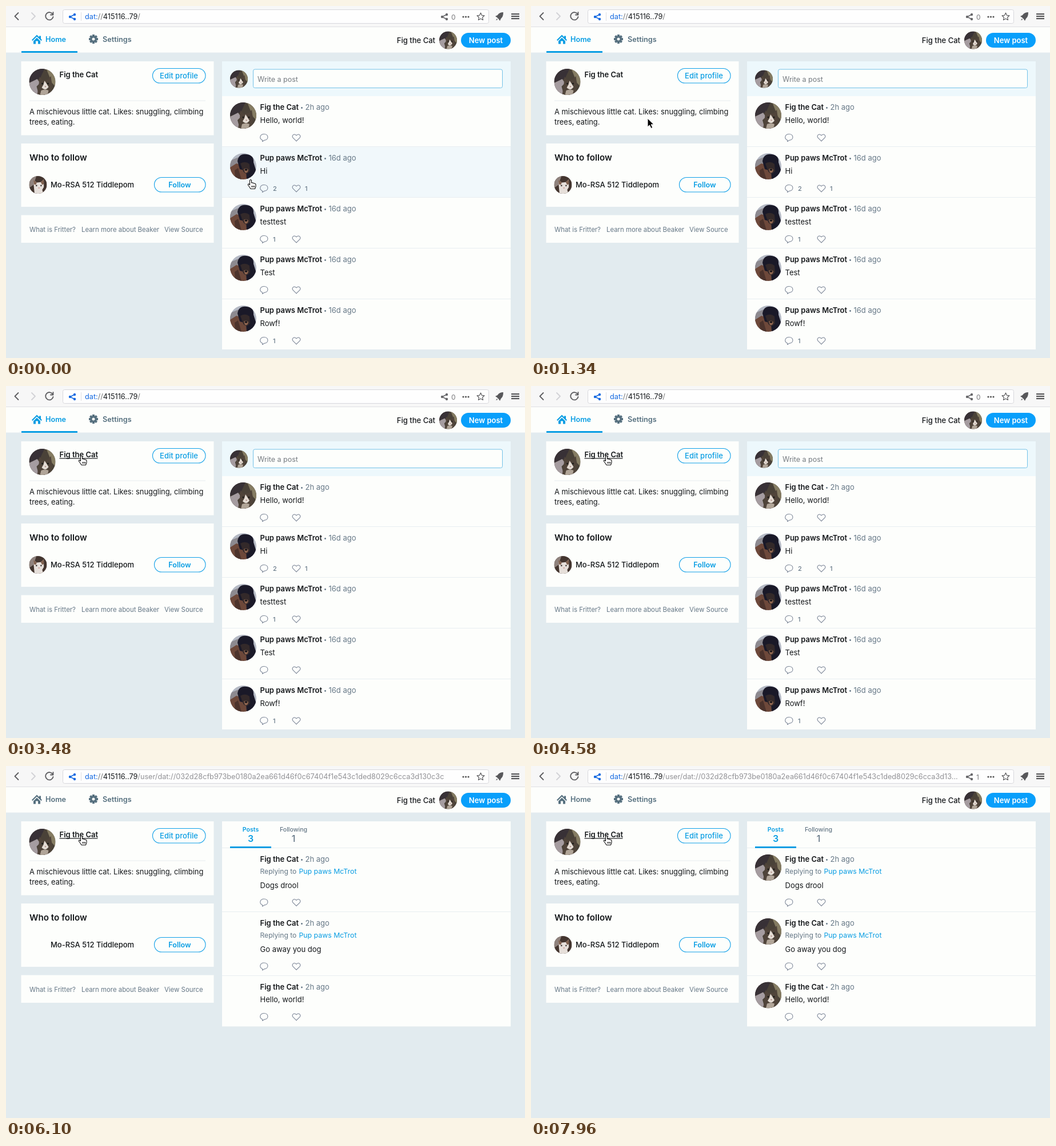
An HTML page that plays this animation: 908 by 617 pixels, repeating every 8 s.

```html
<!DOCTYPE html>
<html lang="en">
<head>
<meta charset="utf-8">
<title>Social feed</title>
<style>
  html, body { margin: 0; width: 100%; height: 100%; overflow: hidden; background: #e2ebef; }
  svg { display: block; width: 100vw; height: 100vh; }
  text { font: 400 13px Inter, sans-serif; fill: #14171a; white-space: pre; }
  .bold { font-weight: 600; }
  .medium { font-weight: 500; }
  .muted { fill: #657786; }
  .blue { fill: #089de3; }
  .card { fill: #fdfefc; }
  .rule { fill: #e8eef1; }
  .pill { fill: #fdfefc; stroke: #0f9fe8; stroke-width: 1.1; }
  .line { fill: none; stroke: #7d8798; stroke-width: 1.1; stroke-linejoin: round; }
  .chrome { fill: none; stroke: #5c5c5f; stroke-width: 1.8; stroke-linecap: round; stroke-linejoin: round; }
  .url { font-size: 12.7px; }
</style>
</head>
<body>
<svg id="stage" viewBox="0 0 908 617" xmlns="http://www.w3.org/2000/svg">
  <defs>
    <clipPath id="round"><circle r="23"/></clipPath>
    <g id="cat" clip-path="url(#round)">
      <rect x="-23" y="-23" width="46" height="46" fill="#4a4238"/>
      <path d="M-23-23H4L-4-6L-23 1Z" fill="#383136"/>
      <path d="M-23 2L-9-5L-4 2L-10 8L-6 23H-23Z" fill="#a59ca0"/>
      <path d="M7-23H23V8L17 2L13-8Z" fill="#857c62"/>
      <path d="M-9 23L-6 4L-5-9L1-3L9-4L15-10L17 5L14 23Z" fill="#50443a"/>
      <path d="M4-2L2 5L-1 10Q5 17 11 9L8 4Z" fill="#e4dcd4"/>
      <path d="M-2 15Q5 12 11 15L9 23H-4Z" fill="#b1a598"/>
      <circle cx="0" cy="3" r="1.5" fill="#1c1b19"/>
      <circle cx="10" cy="3" r="1.5" fill="#1c1b19"/>
      <path d="M4 7.5H7L5.500 9.500Z" fill="#9a6b62"/>
    </g>
    <g id="dog" clip-path="url(#round)">
      <rect x="-23" y="-23" width="46" height="46" fill="#b4b9c4"/>
      <path d="M-23-10L-8-16L-6 2L-23 5Z" fill="#8d8a90"/>
      <path d="M-23 2L-12-5L4 0L10 23H-23Z" fill="#6d483a"/>
      <path d="M-15 7L-9 3L-3 23H-14Z" fill="#4c332c"/>
      <path d="M-10-9Q-8-23 6-21Q19-20 18-7L23 9V23H6L5 8L-6 5Z" fill="#1a1928"/>
      <path d="M-5-5Q4-10 11-4L12 8Q6 17 0 9Z" fill="#33292a"/>
      <path d="M1 5Q6 2 9 6Q8 13 3 11Z" fill="#8f6650"/>
      <ellipse cx="5" cy="6" rx="2.5" ry="1.700" fill="#17151a"/>
    </g>
    <g id="kitten" clip-path="url(#round)">
      <rect x="-23" y="-23" width="46" height="46" fill="#43352f"/>
      <path d="M-23-23H-4L-12 0L-23 8Z" fill="#8f827d"/>
      <path d="M-9 23L-11 2L-12-13L-3-6L7-7L15-14L15 6L11 13L14 23Z" fill="#e6dfda"/>
      <path d="M-12-13L-3-6L-6 0L-11-2ZM15-14L7-7L11 0L15-2Z" fill="#80614f"/>
      <circle cx="-4" cy="2" r="2" fill="#443d3a"/><circle cx="8" cy="2" r="2" fill="#443d3a"/>
      <path d="M0 7H5L2.500 10Z" fill="#cb8f8b"/>
    </g>
    <g id="share">
      <path d="M4-4L-4 0L4 4" fill="none" stroke="currentColor" stroke-width="1.600"/>
      <g fill="currentColor"><circle cx="4" cy="-4" r="2.200"/><circle cx="-4" r="2.200"/><circle cx="4" cy="4" r="2.200"/></g>
    </g>
    <path id="house" d="M-9 1L0-8L4-4V-6H7V-1L9 1L7.500 2.500L0-5L-7.500 2.500ZM-6 3L0-3L6 3V8H2V3H-2V8H-6Z"/>
    <path id="heart" class="line" d="M0 6.300L-6 .3C-8.500-3-4.500-8 0-3.700C4.500-8 8.500-3 6 .3Z"/>
    <path id="bubble" class="line" d="M-3 4.500C-9 2-7.500-6 0-6C8.500-6 8.500 4.500 .5 4.700L-3 7Z"/>
  </defs>
  <g id="page"></g>
  <path id="arrow" d="M0 0V15L3.500 11.800L6 17.500L8.700 16.300L6.200 10.800H11Z" stroke="#fff"/>
  <path id="hand" d="M-1.500 1.500Q0-.5 1.500 1.500V6Q3 4.800 4 6.600Q5.500 5.500 6.500 7.300Q8.700 6.700 9 9V12Q8.500 14 7.500 16.500H0Q-1-14 0 16.500Q-2 13-4.500 10Q-5.500 7.500-3 8L-1.500 9.500Z M2 11V14M4.200 11V14M6.400 11V14" fill="#fff" stroke="#111" stroke-width="1.100" stroke-linejoin="round"/>
</svg>
<script>
const LOOP = 8000;
const NAVIGATE = 5300, LOADED = 5960, AVATARS = 6200, SHARED = 6340;
const CAT = 'Fig the Cat', DOG = 'Pup paws McTrot', KITTEN = 'Mo-RSA 512 Tiddlepom';
const POSTS_TOP = 158, ROW = 89;

const $ = id => document.getElementById(id);
const text = (x, y, str, cls = '', attrs = '') => `<text x="${x}" y="${y}" class="${cls}" ${attrs}>${str}</text>`;
const sized = (x, y, str, size, cls = '', extra = '') => text(x, y, str, cls, `style="font-size:${size}px;${extra}"`);
const centered = (x, y, str, size, cls, extra = '') => sized(x, y, str, size, cls, 'text-anchor:middle;' + extra);
const rect = (x, y, w, h, cls, attrs = '') => `<rect x="${x}" y="${y}" width="${w}" height="${h}" class="${cls}" ${attrs}/>`;
const use = (id, x, y, attrs = '') => `<use href="#${id}" transform="translate(${x} ${y})" ${attrs}/>`;
const avatar = (id, x, y, r = 23) => `<use href="#${id}" transform="translate(${x} ${y}) scale(${r / 23})"/>`;
const group = (id, ...parts) => `<g id="${id}">${parts.join('')}</g>`;
const actions = (y, replies = '', likes = '') =>
  use('bubble', 451.5, y) + use('heart', 508, y) +
  sized(467, y + 4, replies, 11, 'medium muted') + sized(523, y + 4, likes, 11, 'medium muted');
const byline = (y, name, dotX, age) =>
  text(444.5, y, name, 'bold') + `<circle cx="${dotX}" cy="${y - 3.5}" r="1.4" fill="#657786"/>` +
  text(dotX + 6, y, age, 'muted');

const gear = () => {
  const teeth = Array.from({ length: 8 }, (_, i) => rect(-2, -8, 4, 5, '', `transform="rotate(${i * 45})"`)).join('');
  return `<g transform="translate(153 58)" fill="#56707f">${teeth}<circle r="4.300" fill="none" stroke="#56707f" stroke-width="3.600"/></g>`;
};

const host = `<tspan fill="#1469e0">dat:</tspan><tspan fill="#777">//</tspan>415116..79`;
const hash = '032d28cfb973be0180a2ea661d46f0c67404f1e543c1ded8029c6cca3d130c3c';
const profileUrl = key => text(138, 23, `${host}<tspan fill="#929296">/user/dat://${key}</tspan>`, 'url');

const shareCount = (id, count) => group(id,
  use('share', 767, 19, 'color="#68686b"'), sized(779, 23.5, count, 12, '', 'fill:#77777a'));

const chrome = () => [
  rect(0, 0, 908, 37, '', 'fill="#f7f7f7"'), rect(0, 36, 908, 1, '', 'fill="#e0e0e3"'),
  '<path class="chrome" d="M21.500 12L15.500 18L21.500 24"/>',
  '<path class="chrome" d="M45 12L51 18L45 24" style="stroke:#d2d2d6"/>',
  '<path class="chrome" d="M81.500 14A6.700 6.700 0 1 0 82.500 19M82.500 11V15.500H78"/>',
  rect(99.5, 6.5, 745, 24, '', 'rx="3" fill="#fefefe" stroke="#d8d8dc"'),
  use('share', 116, 19, 'color="#1469e0"'), rect(131, 11, 1, 15, '', 'fill="#dedee2"'),
  group('homeUrl', text(138, 23, host + '<tspan fill="#777">/</tspan>', 'url')),
  group('fullUrl', profileUrl(hash)),
  group('cutUrl', profileUrl(hash.slice(0, -4) + '...')),
  shareCount('noShares', 0), shareCount('oneShare', 1),
  ...[800, 804.5, 809].map(x => `<circle cx="${x}" cy="19" r="1.600" fill="#555"/>`),
  '<path class="chrome" d="M830.500 12L832.400 16.300L837 16.800L833.600 20L834.500 24.500L830.500 22.200L826.500 24.500L827.400 20L824 16.800L828.600 16.300Z" style="stroke-width:1.200"/>',
  '<path d="M870 11Q863 11 860 16L856 18L859 20L862 23L864 26L866 22Q870 19 870 11ZM859 22L857 25L860 24Z" fill="#57575a"/>',
  ...[13, 17, 21].map(y => rect(884, y, 14, 2.2, '', 'fill="#555558"'))
].join('');

const navigation = () => [
  rect(0, 37, 908, 45, 'card'), rect(0, 81.5, 908, 1, 'rule'),
  group('homeTab', use('house', 54, 58.5), sized(69, 63, 'Home', 12.7, 'bold', 'fill:inherit')),
  rect(27, 79, 98, 3, 'blue', 'id="homeLine"'),
  gear(), sized(169, 63, 'Settings', 12.7, 'bold', 'fill:#56707f'),
  sized(751, 65, CAT, 13, 'medium', 'text-anchor:end'), avatar('cat', 773.5, 60, 15.5),
  rect(796, 47, 87, 26, '', 'rx="13" fill="#089ffb"'),
  centered(839.5, 65, 'New post', 13, 'bold', 'fill:#fff')
].join('');

const sidebar = () => [
  rect(26.5, 97, 337, 129.5, 'card'), avatar('cat', 63.5, 133), text(93.5, 125, CAT, 'bold'),
  rect(93.5, 126.3, 67, 1.2, '', 'id="nameLine" fill="#14171a"'),
  rect(256.5, 109.5, 92.5, 25.5, 'pill', 'rx="12.750"'), centered(302.5, 127, 'Edit profile', 13, 'medium blue'),
  rect(41, 165.5, 308, 1, 'rule'),
  sized(41, 189.5, 'A mischievous little cat. Likes: snuggling, climbing', 12.9),
  sized(41, 207.5, 'trees, eating.', 12.9),
  group('suggestions',
    rect(26.5, 241, 337, 111, 'card'), sized(41, 271, 'Who to follow', 15.2, 'bold'),
    group('kittenPhoto', avatar('kitten', 56, 313.5, 15.5)), text(78, 318, KITTEN, 'medium'),
    rect(259.5, 300.5, 89.5, 25.5, 'pill', 'rx="12.750"'), centered(304, 318, 'Follow', 12.6, 'bold blue')),
  group('footer',
    rect(26.5, 0, 337, 48.5, 'card'), sized(41, 29.5, 'What is Fritter?', 11.4, 'muted'),
    sized(132, 29.5, 'Learn more about Beaker', 11.4, 'muted'), sized(277, 29.5, 'View Source', 11.4, 'muted'))
].join('');

const timeline = [
  [CAT, 'Hello, world!'], [DOG, 'Hi', 2, 1], [DOG, 'testtest', 1], [DOG, 'Test'], [DOG, 'Rowf!', 1]
];
const timelineRow = ([name, body, replies, likes], i) => {
  const y = POSTS_TOP + i * ROW, isCat = name === CAT;
  return rect(378, y, 505, ROW - 1, '', `id="row${i}"`) + (i < 4 ? rect(378, y + ROW - 1, 505, 1, 'rule') : '') +
    avatar(isCat ? 'cat' : 'dog', 415, y + 34) +
    byline(y + 24, name, isCat ? 517.5 : 558.5, isCat ? '2h ago' : '16d ago') +
    text(444.5, y + 47, body) + actions(y + 72.5, replies, likes);
};
const home = () => group('home',
  rect(378, 97, 505, 61, '', 'fill="#edf8fc"'), avatar('cat', 407.5, 128, 15.5),
  rect(432.5, 111, 436, 32.5, '', 'rx="3" fill="#fdfefc" stroke="#72c1e8"'),
  sized(440, 132.5, 'Write a post', 12.5, '', 'fill:#757b80'), ...timeline.map(timelineRow));

const loading = () => group('loading', rect(378, 97, 505, 47, 'card'),
  '<path id="spinner" d="M3.400-6.200A7.100 7.100 0 1 1-3.400-6.200" fill="none" stroke="#171717" stroke-width="1.700"/>',
  sized(410.5, 126, 'Loading...', 12.8, 'muted'));

const profilePosts = [[144, 'Dogs drool', true], [256, 'Go away you dog', true], [367.5, 'Hello, world!', false]];
const profileRow = ([y, body, isReply]) => {
  const shift = isReply ? 23 : 0;
  return byline(y + 24, CAT, 517.5, '2h ago') +
    (isReply ? sized(444.5, y + 45, 'Replying to', 12.1, 'muted') + sized(512.5, y + 45, DOG, 12.3, 'blue') +
      rect(378, y + 111, 505, 1, 'rule') : '') +
    text(444.5, y + 46.5 + shift, body) + actions(y + 72 + shift);
};
const profile = () => group('profile', rect(378, 97, 505, 359.5, 'card'), rect(378, 143, 505, 1, 'rule'),
  rect(392, 141, 72, 3, 'blue'),
  centered(428, 114.5, 'Posts', 10.6, 'bold blue'), centered(428, 132.5, '3', 16, 'bold blue'),
  centered(503, 114.5, 'Following', 10.6, 'medium muted'), centered(503, 132.5, '1', 16, 'medium muted'),
  ...profilePosts.map(profileRow),
  group('profilePhotos', ...profilePosts.map(([y]) => avatar('cat', 415, y + 34))));

$('page').innerHTML = rect(0, 0, 908, 617, '', 'fill="#e2ebef"') +
  chrome() + navigation() + sidebar() + home() + loading() + profile();
$('hand').setAttribute('d',
  'M-1.5 1.5Q0-.5 1.5 1.5V6Q3 4.8 4 6.6Q5.500 5.500 6.500 7.300Q8.700 6.700 9 9V12Q8.500 14 7.500 16.500H0' +
  'Q-2 13-4.500 10Q-5 7.500-3 8L-1.500 9.500Z M2 11V14M4.200 11V14M6.400 11V14');

// Pointer tip: [time, x, y]
const pointerKeys = [[60, 428, 304], [1000, 204, 197], [1360, 204, 197], [1800, 132, 122]];
const pointerAt = t => {
  const next = pointerKeys.findIndex(key => key[0] > t);
  if (next < 0) return pointerKeys.at(-1).slice(1);
  if (next === 0) return pointerKeys[0].slice(1);
  const [t0, x0, y0] = pointerKeys[next - 1], [t1, x1, y1] = pointerKeys[next];
  const p = (t - t0) / (t1 - t0), e = p * p * (3 - 2 * p);
  return [x0 + (x1 - x0) * e, y0 + (y1 - y0) * e];
};
const show = (id, visible) => { $(id).style.display = visible ? '' : 'none'; };

function render(t) {
  const atHome = t < NAVIGATE, isLoading = !atHome && t < LOADED;
  const shared = t >= SHARED, photos = t >= AVATARS;
  const [x, y] = pointerAt(t);
  const overName = x > 93 && x < 161 && y > 112 && y < 128;
  const hoveredRow = x > 378 ? Math.floor((y - POSTS_TOP) / ROW) : -1;
  const pointing = overName || hoveredRow >= 0;

  show('home', atHome);
  show('homeUrl', atHome);
  show('noShares', atHome);
  show('homeLine', atHome);
  show('loading', isLoading);
  show('suggestions', !isLoading);
  show('kittenPhoto', atHome || photos);
  show('profile', t >= LOADED);
  show('profilePhotos', photos);
  show('fullUrl', !atHome && !shared);
  show('cutUrl', shared);
  show('oneShare', shared);
  show('nameLine', overName);
  show('hand', pointing);
  show('arrow', !pointing);

  $('homeTab').style.fill = atHome ? '#089de3' : '#56707f';
  $('footer').setAttribute('transform', `translate(0 ${isLoading ? 241 : 366.5})`);
  $('spinner').setAttribute('transform', `translate(399.5 118.5) rotate(${(t - 5540) * 0.36})`);
  timeline.forEach((_, i) => $('row' + i).setAttribute('fill', i === hoveredRow ? '#f1f8fb' : '#fdfefc'));
  for (const id of ['hand', 'arrow']) $(id).setAttribute('transform', `translate(${x} ${y})`);
}

const start = performance.now();
function tick() {
  render((performance.now() - start) % LOOP);
  requestAnimationFrame(tick);
}
tick();
</script>
</body>
</html>
```
